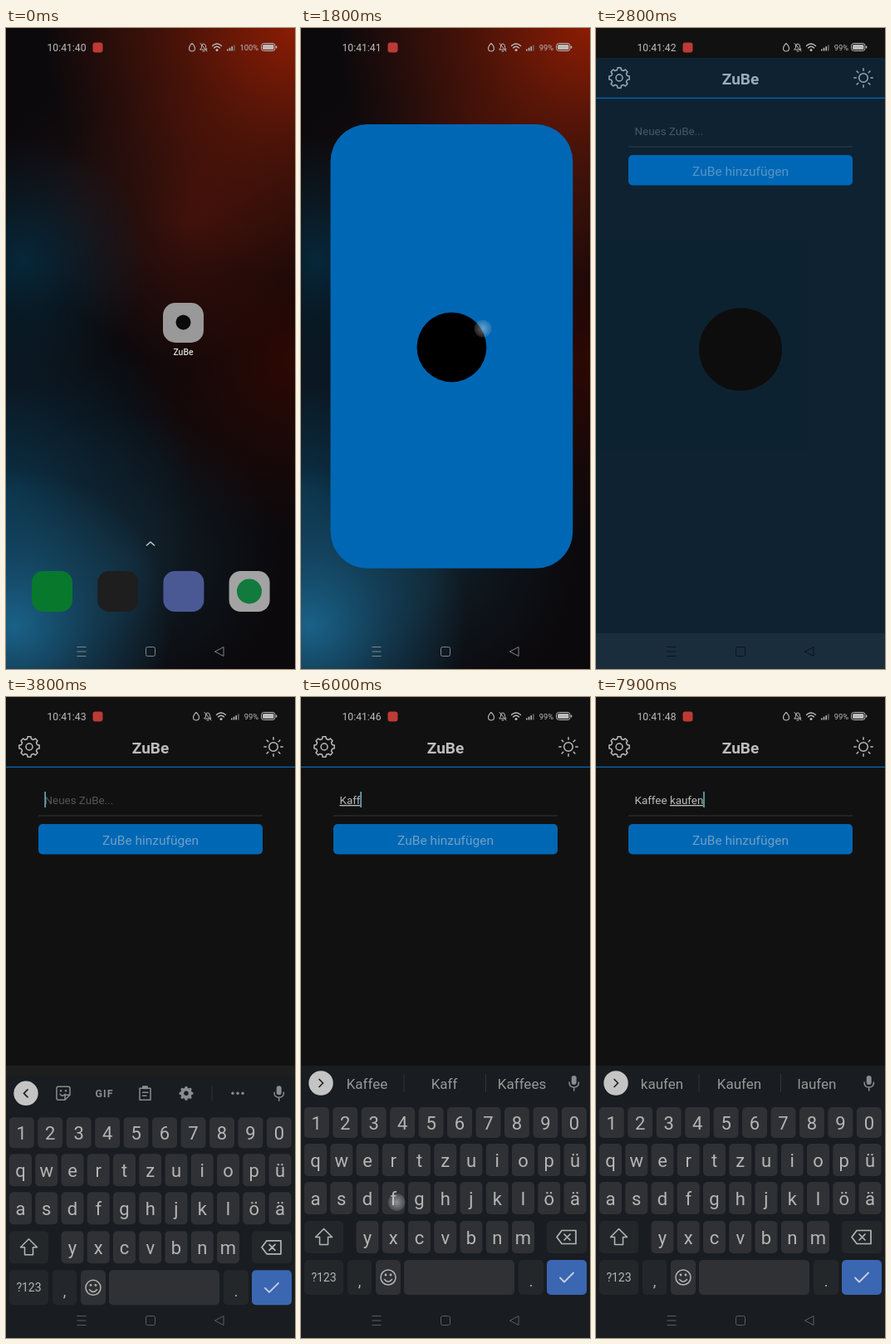
An HTML page that plays this animation: 348 by 772 pixels, repeating every 8 s.

```html
<!DOCTYPE html>
<html lang="de">
<head>
<meta charset="utf-8">
<title>App-Start und Eingabe</title>
<style>
  html, body { margin: 0; width: 100%; height: 100%; overflow: hidden; background: #111; }
  svg { display: block; width: 100vw; height: 100vh; }
  text { font-family: Roboto, sans-serif; white-space: pre; }
  .line { fill: none; stroke: #bbb; stroke-width: 1.5; stroke-linecap: round; stroke-linejoin: round; }
</style>
</head>
<body>
<svg id="stage" viewBox="0 0 348 772"></svg>
<script>
const LOOP = 8000;
const APP = 'ZuBe';
const BLUE = '#0067b5';
const LAUNCH = 1620, LAUNCHED = 2150, REVEAL = 2640;

// Drawing helpers
const rect = (x, y, w, h, fill, r = 0, extra = '') =>
  `<rect x="${x}" y="${y}" width="${w}" height="${h}" rx="${r}" fill="${fill}" ${extra}/>`;
const circle = (x, y, r, fill, extra = '') =>
  `<circle cx="${x}" cy="${y}" r="${r}" fill="${fill}" ${extra}/>`;
const text = (x, y, str, size, fill, extra = 'text-anchor="middle"') =>
  `<text x="${x}" y="${y}" font-size="${size}" fill="${fill}" ${extra}>${str.replace('&', '&amp;')}</text>`;
const line = (d, color = '#bbb', width = 1.5, extra = '') =>
  `<path class="line" d="${d}" style="stroke:${color};stroke-width:${width}" ${extra}/>`;
const group = (id, body) => `<g id="${id}">${body}</g>`;

function gear(cx, cy, r, teeth) {
  const profile = [[-.32, .8], [-.2, 1], [.2, 1], [.32, .8]];
  let d = '';
  for (let i = 0; i < teeth; i++) {
    for (const [offset, scale] of profile) {
      const a = (i + offset) / teeth * 2 * Math.PI - Math.PI / 2;
      d += `${d ? 'L' : 'M'}${(cx + r * scale * Math.cos(a)).toFixed(2)} ${(cy + r * scale * Math.sin(a)).toFixed(2)}`;
    }
  }
  return d + 'Z';
}

function wallpaper() {
  const glows = [
    [348, 400, 210, '#300802', .9], [215, 235, 170, '#4a120a', .75],
    [345, 0, 300, '#8a1d04', 1], [110, 200, 130, '#24100e', .7],
    [20, 280, 150, '#062a3e', .9], [0, 560, 230, '#0a3a55', .8],
    [150, 640, 180, '#15303f', .6], [10, 720, 190, '#1b6a94', .9]
  ];
  return rect(0, 0, 348, 772, '#0b090c') + glows.map(([x, y, r, color, alpha], i) => `
    <radialGradient id="glow${i}"><stop stop-color="${color}" stop-opacity="${alpha}"/>
    <stop offset=".5" stop-color="${color}" stop-opacity="${alpha * .45}"/>
    <stop offset="1" stop-color="${color}" stop-opacity="0"/></radialGradient>` +
    circle(x, y, r, `url(#glow${i})`)).join('');
}

function home() {
  const dock = ['#08782c', '#1e1e1e', '#4a5894', '#a3a3a3'];
  return rect(189, 331, 49, 48, '#999', 15) + circle(213.5, 354.5, 9, '#0a0a0a') +
    text(213.5, 394, APP, 10.4, '#ddd', 'text-anchor="middle" font-weight="500"') +
    line('M169.5 623L174 619L178.500 623', '#ccc') +
    dock.map((fill, i) => rect(31 + 79.2 * i, 654, 49, 49, fill, 14)).join('') +
    circle(293, 678.5, 15, '#127a3c');
}

function sun(cx, cy) {
  let d = '';
  for (let i = 0; i < 8; i++) {
    const c = Math.cos(i * Math.PI / 4), s = Math.sin(i * Math.PI / 4);
    d += `M${cx + 8.8 * c} ${cy + 8.8 * s}L${cx + 11.2 * c} ${cy + 11.2 * s}`;
  }
  return line(d) + circle(cx, cy, 5.3, 'none', 'class="line"');
}

function app() {
  return rect(0, 0, 348, 772, '#111') +
    line(gear(28, 60, 12.3, 8)) + circle(28, 60, 4, 'none', 'class="line"') +
    text(174, 67.500, APP, 19, '#bdbdbd', 'text-anchor="middle" font-weight="700"') + sun(322, 60) +
    rect(0, 83.7, 348, 1.4, '#0a62a8') +
    text(46.5, 129, `Neues ${APP}...`, 13.4, '#555', 'id="placeholder"') +
    '<text id="field" x="46.500" y="129" font-size="13.400" fill="#bbb"><tspan></tspan><tspan text-decoration="underline"></tspan></text>' +
    rect(46, 114, 1.7, 19, '#62a5b0', 0, 'id="cursor"') +
    rect(39, 142.5, 270, 1, '#3a3733') + rect(39, 153, 270, 36.5, BLUE, 5) +
    text(174, 177.5, `${APP} hinzufügen`, 15.5, '#6ba0c5');
}

// Keyboard
const keyCenter = { ' ': [186, 708] };
const rows = [
  { lower: '1234567890', upper: '!@#$%^&*()', x: 18.8, step: 34.45, y: 494, w: 30, h: 37, base: 520.5 },
  { lower: 'qwertzuiopü', x: 17.5, step: 31.25, y: 538, w: 27, h: 39, base: 565.5 },
  { lower: 'asdfghjklöä', x: 17.5, step: 31.25, y: 584, w: 27, h: 39, base: 612 },
  { lower: 'yxcvbnm', x: 80, step: 31.25, y: 631, w: 27, h: 39, base: 658.5 }
];

function keyboard() {
  const KEY = '#2f3134', DARK = '#24272a', INK = '#b5b5b5', GREY = '#8a8c8e';
  let keys = '', lower = '', upper = '';
  for (const row of rows) {
    const caps = row.upper || row.lower.toUpperCase();
    [...row.lower].forEach((char, i) => {
      const x = row.x + i * row.step;
      keyCenter[char] = [x, row.y + row.h / 2];
      keys += rect(x - row.w / 2, row.y, row.w, row.h, KEY, 5);
      lower += text(x, row.base, char, 22, INK);
      upper += text(x, row.base, caps[i], 22, INK);
    });
  }
  keys += [[4, 631, 47, DARK], [296, 631, 48, DARK], [4, 678, 47, DARK], [56, 678, 29, DARK],
    [90, 678, 30, KEY], [124, 678, 133, KEY], [262, 678, 30, DARK], [296, 678, 48, '#3a66b2']]
    .map(([x, y, w, fill]) => rect(x, y, w, y > 650 ? 42 : 39, fill, 5)).join('');
  const shift = 'M27.5 640.500L37.500 650.500H32.500V659.500H22.500V650.500H17.500Z';
  lower += line(shift, INK);
  upper += line(shift, INK, 1.5, `style="fill:${INK}"`).replace('style="stroke', `style="fill:${INK};stroke`);
  const symbols = line('M314 642.500H331V658.500H314L308 650.500ZM317 647L324 654M324 647L317 654', INK, 1.7) +
    text(27.5, 704, '?123', 14, INK) + text(70.5, 710, ',', 18, INK) + text(277, 710, '.', 18, INK) +
    line('M96 699a9 9 0 1 0 18 0a9 9 0 1 0 -18 0M100.500 701.500Q105 707 109.500 701.500', INK) +
    circle(102, 696, 1.4, INK) + circle(108, 696, 1.4, INK) +
    line('M312 699.500L317 704.500L328 693.500', '#c8d0dc', 1.9);
  const toolbar = line('M63 457H75Q77 457 77 459V467L71 473H63Q61 473 61 471V459Q61 457 63 457ZM77 467H73Q71 467 71 469V473M65 466Q68 470 71 466', GREY) +
    circle(66, 462, 1.2, GREY) + circle(72, 462, 1.2, GREY) +
    text(118.5, 469.5, 'GIF', 12.5, GREY, 'text-anchor="middle" font-weight="700" letter-spacing="1"') +
    line('M161 459H174V473H161ZM164.500 464H171M164.500 468H169', GREY) + rect(164, 456, 7, 4, GREY, 1) +
    `<path d="${gear(217, 465, 8.500, 8)}" fill="${GREY}"/>` + circle(217, 465, 2.7, '#191c20') +
    rect(247.5, 456, 1, 18, '#303337') + [273, 279, 285].map(x => circle(x, 465, 1.7, GREY)).join('');
  const suggestions = [79.5, 172.5, 266].map(x => text(x, 471.5, '', 17, '#999')).join('') +
    rect(123.5, 454, 1, 22, '#303337') + rect(222, 454, 1, 22, '#303337');
  return rect(0, 444, 348, 340, '#191c20') + circle(24, 465, 14.700, '#c4c4c4') +
    line('', '#222', 1.7, 'id="arrow"') +
    rect(325.7, 456, 6, 11, GREY, 3) + line('M323 464Q323 470 328.700 470Q334.500 470 334.500 464M328.700 470V474', GREY) +
    group('toolbar', toolbar) + group('suggestions', suggestions) +
    keys + group('lower', lower) + group('upper', upper) + symbols;
}

function status() {
  const C = '#bbb';
  const icons = line('M224 18.500Q220.500 22 220.500 24.500A3.500 3.500 0 0 0 227.500 24.500Q227.500 22 224 18.500Z', C, 1.1) +
    line('M234 26H242L240.500 23.500V22Q240 19 238 19Q235.500 19 235.500 22V23.500ZM237 28H239M234 18.500L242 28', C, 1) +
    line('M248.500 21.500Q254 16.500 259.500 21.500M250.500 24Q254 20.500 257.500 24', C, 1.3) + circle(254, 26.5, 1.5, C) +
    [0, 1, 2, 3].map(i => rect(266 + i * 2.7, 25.5 - i * 1.7, 1.6, 2 + i * 1.7, i < 3 ? C : '#666')).join('');
  return text(49.5, 27.5, '', 12.2, C, 'id="clock"') + rect(104.5, 17.5, 12, 12, '#bd3a35', 3) +
    group('icons', icons) + text(304, 26.5, '', 9.3, C, 'id="charge" text-anchor="end"') +
    rect(307.5, 18.5, 16.500, 9, 'none', 3, `stroke="${C}"`) + rect(309, 20, 13.5, 6, C, 1.5) + rect(325, 21.5, 1.3, 3, C, .6);
}

document.getElementById('stage').innerHTML =
  `<radialGradient id="tap"><stop stop-color="#fff" stop-opacity=".75"/><stop offset=".6" stop-color="#ddd" stop-opacity=".5"/>
   <stop offset="1" stop-color="#bbb" stop-opacity=".3"/></radialGradient>` +
  wallpaper() + group('home', home()) + group('app', app()) +
  group('splash', rect(0, 0, 0, 0, BLUE, 0, 'id="window"') + circle(0, 0, 0, '#000', 'id="badge"')) +
  rect(0, 729, 348, 43, '#fff', 0, 'id="navShade" opacity=".05"') +
  rect(0, 444, 348, 328, '#1e1e1e', 0, 'id="backdrop"') + group('keyboard', keyboard()) +
  rect(0, 0, 348, 36, '#111', 0, 'id="statusShade"') + status() +
  '<path id="nav" fill="none" d="M85.500 745.500H96.500M85.500 751H96.500M85.500 756.500H96.500M170.500 745.500H177.500Q179.500 745.500 179.500 747.500V754.500Q179.500 756.500 177.500 756.500H170.500Q168.500 756.500 168.500 754.500V747.500Q168.500 745.500 170.500 745.500ZM251.500 751L262 745.500V756.500Z"/>' +
  group('touches', '');

// Typing: time, key, vertical touch offset, suggestions that follow
const presses = [
  [5200, 'K', 4, 'K|Keine|Kann'], [5430, 'a', 2, 'Ka|Kann|Kaffee'],
  [5650, 'f', 5, 'Kaffee|Kaf|Kauf'], [5840, 'f', 5, 'Kaffee|Kaff|Kaffees'],
  [6020, 'e', 4, 'Kaffee|Kaffe|Kaffees'], [6210, 'e', 4, 'Kaffee|Kaffees|Kaffeepause'],
  [6450, ' ', 10, 'und|trinken|kochen'], [6720, 'k', 10, 'k|Kuchen|kochen'],
  [6880, 'a', 0, 'kann|kaufen|Karte'], [7060, 'u', 5, 'kaufen|kaum|Kauf'],
  [7240, 'f', 5, 'kaufen|Kauf|kauf'], [7420, 'e', 5, 'kaufen|kaufe|Kaufen'],
  [7600, 'n', 10, 'kaufen|Kaufen|laufen']
].map(([time, char, dy, words]) => {
  const [x, y] = keyCenter[char.toLowerCase()];
  return { time, char, x: x + 4, y: y + dy, words: words.split('|') };
});
const taps = [{ time: LAUNCH, x: 219, y: 362 }, ...presses];

const el = Object.fromEntries([...document.querySelectorAll('[id]')].map(node => [node.id, node]));
const set = (node, attrs) => { for (const name in attrs) node.setAttribute(name, attrs[name]); };
const show = (node, visible) => { node.style.display = visible ? '' : 'none'; };
const progress = (t, from, to) => Math.min(1, Math.max(0, (t - from) / (to - from)));
const easeOut = (p, power) => 1 - (1 - p) ** power;
const mix = (a, b, p) => a + (b - a) * p;

function drawLaunch(t) {
  const p = progress(t, LAUNCH, LAUNCHED);
  const wide = easeOut(p, 4), tall = easeOut(p, 2.67);
  const w = mix(49, 348, wide), h = mix(48, 772, tall);
  const cx = mix(213.5, 174, wide), cy = mix(355, 386, easeOut(p, 6));
  set(el.window, { x: cx - w / 2, y: cy - h / 2, width: w, height: h, rx: Math.min(w * .31, 136 * (1 - tall)) });
  set(el.badge, { cx, cy: cy + 1, r: 50 * w / 348 });
  set(el.splash, { opacity: progress(t, LAUNCH, LAUNCH + 80) * (1 - progress(t, REVEAL, REVEAL + 200)) });
  set(el.home, { opacity: 1 - progress(t, LAUNCH, LAUNCH + 160) });
  show(el.app, t >= REVEAL);
  show(el.statusShade, t >= REVEAL);
  show(el.navShade, t >= LAUNCHED);
}

function drawStatus(t) {
  el.clock.textContent = `10:41:${40 + Math.floor((t + 120) / 1000)}`;
  el.charge.textContent = t < 880 ? '100%' : '99%';
  set(el.icons, { transform: `translate(${t < 880 ? 0 : 5})` });
  set(el.nav, { stroke: t >= LAUNCHED && t < 3100 ? '#07141e' : t < LAUNCHED ? '#858585' : '#5c5e60' });
}

function drawKeyboard(t) {
  const slide = 328 * (1 - easeOut(progress(t, 3550, 3900), 2.6));
  set(el.keyboard, { transform: `translate(0 ${slide})` });
  show(el.keyboard, t >= 3550);
  show(el.backdrop, t >= 3550);
  const caps = t >= 3960 && t < presses[0].time;
  show(el.upper, caps);
  show(el.lower, !caps);
  const latest = presses.filter(press => press.time + 100 <= t).pop();
  show(el.toolbar, !latest);
  show(el.suggestions, latest);
  set(el.arrow, { d: latest ? 'M22 460.500L26.500 465L22 469.500' : 'M26 460.500L21.500 465L26 469.500' });
  if (latest) el.suggestions.querySelectorAll('text').forEach((node, i) => node.textContent = latest.words[i]);
}

function drawField(t) {
  const typed = presses.filter(press => press.time <= t).map(press => press.char).join('');
  const split = typed.lastIndexOf(' ') + 1;
  el.field.children[0].textContent = typed.slice(0, split);
  el.field.children[1].textContent = typed.slice(split);
  show(el.placeholder, !typed);
  show(el.cursor, t >= 3550 && !(t >= 4200 && t < 4600));
  set(el.cursor, { x: 46.3 + (typed ? el.field.getComputedTextLength() : 0) });
}

function drawTouches(t) {
  el.touches.innerHTML = taps.filter(tap => t >= tap.time && t < tap.time + 300)
    .map(tap => circle(tap.x, tap.y, 10.5, 'url(#tap)', `opacity="${1 - progress(t, tap.time + 80, tap.time + 300)}"`)).join('');
}

function frame() {
  const t = performance.now() % LOOP;
  drawLaunch(t);
  drawStatus(t);
  drawKeyboard(t);
  drawField(t);
  drawTouches(t);
  requestAnimationFrame(frame);
}
frame();
</script>
</body>
</html>
```
